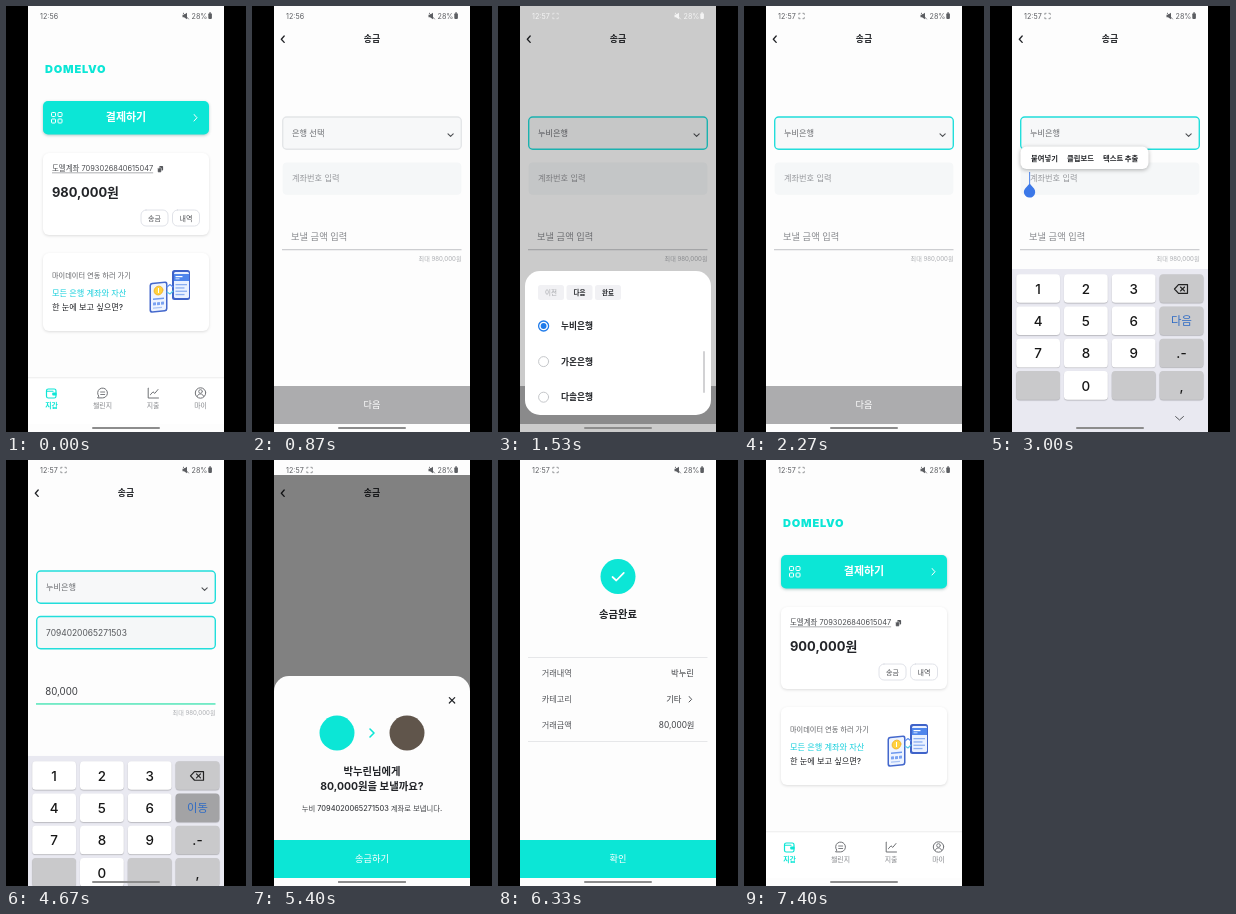
Animation of 240 by 426 pixels, one loop 7.47 s. Source, as an HTML page with a canvas:

```html
<!DOCTYPE html>
<html lang="ko">
<head>
<meta charset="utf-8">
<title>송금</title>
<style>
html, body { margin: 0; width: 100%; height: 100%; overflow: hidden; background: #000; }
canvas { display: block; width: 240px; height: 426px; }
</style>
</head>
<body>
<canvas id="stage"></canvas>
<script>
const W = 240, H = 426, LOOP = 7470, FPS = 15;
const TEAL = '#0ce6d6', RING = '#22dedb', INK = '#222428', GRAY = '#6c6e72', PAPER = '#fdfdfd';
const FONT = 'Inter, "Noto Sans CJK KR", "Noto Sans CJK", sans-serif';
const BANKS = ['누비은행', '가온은행', '다솔은행'];
const PAYEE = '박누린', PAYEE_ACCOUNT = '7094020065271503', MY_ACCOUNT = '7093026840615047';

const canvas = document.getElementById('stage');
const c = canvas.getContext('2d');
const ratio = Math.max(1, window.devicePixelRatio || 1);
canvas.width = W * ratio;
canvas.height = H * ratio;

const clamp = v => Math.max(0, Math.min(1, v));
const ease = v => 1 - Math.pow(1 - clamp(v), 3);
// rises after `a`, falls after `b`
const pulse = (t, a, b, d = 230) => ease((t - a) / d) * (1 - ease((t - b) / d));
const within = (t, a, b) => t >= a && t < b;

function rect(x, y, w, h, color) {
  c.fillStyle = color;
  c.fillRect(x, y, w, h);
}
function box(x, y, w, h, r, fill, stroke, lw = 1) {
  c.beginPath();
  c.roundRect(x, y, w, h, r);
  if (fill) { c.fillStyle = fill; c.fill(); }
  if (stroke) { c.strokeStyle = stroke; c.lineWidth = lw; c.stroke(); }
}
function disc(x, y, r, fill, stroke, lw = 1) {
  c.beginPath();
  c.arc(x, y, r, 0, 7);
  if (fill) { c.fillStyle = fill; c.fill(); }
  if (stroke) { c.strokeStyle = stroke; c.lineWidth = lw; c.stroke(); }
}
function line(color, lw, ...p) {
  c.beginPath();
  for (let i = 0; i < p.length; i += 2) c.lineTo(p[i], p[i + 1]);
  c.strokeStyle = color;
  c.lineWidth = lw;
  c.lineCap = c.lineJoin = 'round';
  c.stroke();
}
function text(s, x, y, size, color = INK, weight = 400, align = 'left') {
  c.font = `${weight} ${size}px ${FONT}`;
  c.fillStyle = color;
  c.textAlign = align;
  c.textBaseline = 'alphabetic';
  c.fillText(s, x, y + size * 0.36);
  return c.measureText(s).width;
}
const mid = (s, x, y, size, color, weight) => text(s, x, y, size, color, weight, 'center');
const right = (s, x, y, size, color, weight) => text(s, x, y, size, color, weight, 'right');

function shadowed(blur, dy, color, draw) {
  c.save();
  c.shadowColor = color;
  c.shadowBlur = blur * ratio;
  c.shadowOffsetY = dy * ratio;
  draw();
  c.restore();
}
function dim(alpha, y = 0) {
  rect(22, y, 196, H - y, `rgba(0,0,0,${alpha})`);
}
function homeBar() {
  box(86, 421, 68, 2, 1, '#8c8c8c');
}
function actionBar(label, color = TEAL) {
  rect(22, 380, 196, 38, color);
  mid(label, 120, 399, 9.2, '#fff', 500);
}

function status(t, col) {
  const late = t >= 900;
  text(late ? '12:57' : '12:56', 34, 10, 7.2, col);
  if (late) {
    for (const sx of [-1, 1]) for (const sy of [-1, 1]) {
      line(col, 0.6, 57.5 + sx * 2.7, 10 + sy * 1.4, 57.5 + sx * 2.7, 10 + sy * 2.7, 57.5 + sx * 1.4, 10 + sy * 2.7);
    }
  }
  c.beginPath();
  c.moveTo(176.5, 8.7); c.lineTo(178, 8.7); c.lineTo(181, 6.8);
  c.lineTo(181, 13.2); c.lineTo(178, 11.3); c.lineTo(176.5, 11.3);
  c.fillStyle = col;
  c.fill();
  line(col, 0.8, 177, 7, 182.5, 13);
  text('28%', 185.5, 10, 7.2, col);
  box(202.3, 7.2, 3.6, 5.8, 1, col);
  rect(203.2, 6.4, 1.8, 1, col);
}

function card(y, h) {
  shadowed(3, 1, 'rgba(0,0,0,.13)', () => box(37, y, 166, h, 6, '#fff'));
}

function phones() {
  box(166, 264, 18, 30, 2.5, '#3f63c9');
  box(168, 266, 15, 26, 1.5, '#eaf1ff');
  rect(168, 268, 15, 7, '#4f86ec');
  rect(169.5, 270, 7, 1.2, '#fff');
  rect(169.5, 272.3, 4, 1, '#cfe0ff');
  for (let i = 0; i < 4; i++) rect(169.5, 278 + i * 3.3, i % 2 ? 9 : 11.5, 1.3, '#8aaef2');
  c.save();
  c.transform(1, -0.1, 0, 1, 0, 15.3);
  box(143.5, 276, 18, 30, 2.5, '#4468cc');
  box(145, 277.5, 15, 27, 1.5, '#eef4ff');
  disc(152.5, 284.5, 4.4, '#ffd23e', '#f0ac20', 0.8);
  rect(152, 282, 1, 5, '#fff');
  rect(147, 292, 11, 1.5, '#6d98ee');
  for (let i = 0; i < 3; i++) box(147 + i * 4, 296, 3, 3, 0.5, '#7ba3f2');
  rect(147, 301, 9, 1.2, '#a9c3f5');
  c.restore();
  line('#5d8ff0', 1.1, 161, 281, 164, 278.5, 167, 281);
  line('#55c8e8', 1.1, 161, 286, 164, 288, 167, 285);
}

function tabBar() {
  rect(22, 372, 196, 46, '#fff');
  rect(22, 371.5, 196, 0.7, '#e6e6e6');
  const tabs = [['지갑', 45.5], ['챌린지', 96.5], ['지출', 147], ['마이', 194.5]];
  tabs.forEach(([name, x], i) => mid(name, x, 399.5, 6.9, i ? '#85878b' : TEAL, i ? 400 : 700));
  const g = '#6f7175';
  box(40.5, 383, 9.5, 9, 1.8, null, TEAL, 1.2);
  line(TEAL, 1.1, 41, 385.3, 47, 385.3);
  box(46.2, 386.6, 4.4, 3, 1, TEAL);
  c.beginPath();
  c.arc(96.5, 387, 4.9, Math.PI * 0.8, Math.PI * 2.5);
  c.lineTo(92, 391.9);
  c.closePath();
  c.strokeStyle = g;
  c.lineWidth = 1;
  c.stroke();
  line(g, 0.9, 94.5, 386, 98.7, 386);
  line(g, 0.9, 94.5, 388.5, 98.7, 388.5);
  line(g, 1, 142.2, 382, 142.2, 392, 152.5, 392);
  line(g, 1, 144.3, 388.8, 147, 385.8, 148.8, 387.4, 152, 383.5);
  disc(194.5, 387, 5.2, null, g, 1);
  disc(194.5, 385.5, 1.8, null, g, 0.9);
  c.beginPath();
  c.arc(194.5, 391.4, 3.4, Math.PI * 1.1, Math.PI * 1.9);
  c.stroke();
}

function home(balance, pressed) {
  c.letterSpacing = '0.8px';
  text('DOMELVO', 39, 63.4, 11, TEAL, 900);
  c.letterSpacing = '0px';

  shadowed(3, 1, 'rgba(0,80,75,.3)', () => box(37, 95, 166, 33.5, 5, TEAL));
  for (const x of [45.5, 52]) for (const y of [106.5, 113]) box(x, y, 4, 4, 0.8, null, '#fff', 1);
  mid('결제하기', 120, 111.5, 11, '#fff', 700);
  line('#fff', 1, 188, 108.5, 191, 111.7, 188, 115);

  card(147, 82);
  const w = text('도멜계좌 ' + MY_ACCOUNT, 46, 162.5, 7.45, '#4a4c50');
  rect(46, 166.6, w, 0.6, '#77797d');
  box(153.3, 160, 3.8, 4.6, 0.8, '#55575b');
  box(151.6, 161.8, 3.8, 4.6, 0.8, '#55575b', '#fff', 0.5);
  text(balance, 46, 186, 12.9, INK, 700);
  box(135, 204, 27, 16, 5, pressed ? '#e3e5e8' : '#fff', '#d9dbe2', 0.8);
  box(166.5, 204, 27, 16, 5, '#fff', '#d9dbe2', 0.8);
  mid('송금', 148.5, 212, 7, '#4c4e52');
  mid('내역', 180, 212, 7, '#4c4e52');

  card(247, 78);
  text('마이데이터 연동 하러 가기', 46, 269, 7.2, '#606266');
  text('모든 은행 계좌와 자산', 46, 287.5, 8.2, '#16cfdc', 500);
  text('한 눈에 보고 싶으면?', 46, 301, 8.2, INK, 500);
  phones();
  tabBar();
}

function header() {
  line(INK, 1.3, 32.2, 30, 29.3, 33.2, 32.2, 36.4);
  mid('송금', 120, 33.2, 8.9, INK, 700);
}

function caret(x, y, h) {
  rect(x, y - h / 2, 0.8, h, '#555');
}

function typed(t) {
  const keys = [3700, 3870, 4070, 4230, 4400];
  const n = keys.filter(k => t >= k).length;
  return n ? Number('80000'.slice(0, n)).toLocaleString('en-US') : '';
}

function form(t) {
  header();
  const picked = t >= 1400, pasted = t >= 3200, amount = typed(t);
  box(30.7, 111, 178.6, 32.3, 4, '#f7f8f9', t >= 1000 ? RING : '#e4e6e8', 1.4);
  text(picked ? BANKS[0] : '은행 선택', 40, 127, 8.2, GRAY);
  line('#4d4f53', 1.1, 196, 127.8, 198.6, 130.4, 201.2, 127.8);

  box(30.7, 156.5, 178.6, 32.3, 4, '#f5f7f8', pasted ? RING : null, 1.4);
  if (pasted) text(PAYEE_ACCOUNT, 40, 173, 8.45, '#55575b');
  else text('계좌번호 입력', 40, 172.5, 8.2, '#96989c');

  if (amount) {
    const w = text(amount, 39.2, 232, 9.7, '#3d3f43');
    if (t < 4600) caret(39.2 + w, 232, 11);
  } else {
    text('보낼 금액 입력', 39, 230.5, 9.25, '#898b8f');
    if (within(t, 3500, 4600)) caret(38.5, 231, 11);
  }
  rect(30, 243.3, 179.5, amount ? 1.3 : 0.9, amount ? '#3be3b0' : '#b9bbbf');
  right('최대 980,000원', 209.5, 253, 6.1, '#adafb3');
  actionBar('다음', amount ? TEAL : '#acacae');
}

function pasteMenu() {
  shadowed(4, 1, 'rgba(0,0,0,.3)', () => box(30.5, 140.5, 128, 22.5, 6, '#fff'));
  text('붙여넣기', 41, 152, 7.3, INK, 700);
  text('클립보드', 77, 152, 7.3, INK, 700);
  text('텍스트 추출', 113, 152, 7.3, INK, 700);
}

function handle() {
  rect(39.2, 166, 0.9, 13, '#3c78e8');
  c.beginPath();
  c.moveTo(39.6, 177.5);
  c.lineTo(44, 182.5);
  c.arc(39.6, 186, 5.6, -0.66, Math.PI + 0.66);
  c.closePath();
  c.fillStyle = '#3c78e8';
  c.fill();
}

function keyboard(t, shift) {
  c.save();
  c.translate(0, shift);
  rect(22, 263, 196, 163, '#e9e9f1');
  const rows = ['123<', '456>', '789.', ' 0 ,'];
  const hits = [['8', 3690], ['0', 3860], ['0', 4050], ['0', 4215], ['0', 4385], ['>', 3400], ['>', 4590]];
  rows.forEach((row, j) => [...row].forEach((k, i) => {
    const x = 26.2 + i * 47.8, y = 268.2 + j * 32.3;
    const gray = i === 3 || k === ' ';
    const hit = hits.some(h => h[0] === k && within(t, h[1], h[1] + 120));
    shadowed(1, 0.7, 'rgba(0,0,0,.25)', () =>
      box(x, y, 43.8, 28.6, 3.5, hit ? '#a3a3a5' : gray ? '#c9c9cb' : '#fff'));
    const cx = x + 21.9, cy = y + 14.8;
    if (k === '<') {
      line('#222', 1.2, cx - 7, cy, cx - 3, cy - 4.3, cx + 6, cy - 4.3, cx + 6, cy + 4.3, cx - 3, cy + 4.3, cx - 7, cy);
      line('#222', 1.1, cx - 1, cy - 2, cx + 3, cy + 2);
      line('#222', 1.1, cx + 3, cy - 2, cx - 1, cy + 2);
    } else if (k === '>') {
      mid(t < 3500 ? '다음' : '이동', cx, cy, 11.3, '#2f6bc4', 400);
    } else if (k !== ' ') {
      mid(k === '.' ? '.-' : k, cx, cy, 13.4, '#161616', 500);
    }
  }));
  line('#55575b', 1, 185.5, 410.5, 189.5, 414, 193.5, 410.5);
  c.restore();
}

function bankSheet(t, shown) {
  dim(0.2 * shown);
  c.save();
  c.translate(0, (1 - shown) * 165);
  box(27, 265, 186, 144, 15, '#fff');
  ['이전', '다음', '완료'].forEach((s, i) => {
    box(40 + i * 28.5, 279, 26, 15, 2.5, '#f1f1f4');
    mid(s, 53 + i * 28.5, 286.7, 6.5, i ? INK : '#a0a2a6', i ? 700 : 400);
  });
  BANKS.forEach((name, i) => {
    const y = 320 + i * 35.6, on = i === 0 && t >= 1400;
    disc(45.6, y, 5, '#fff', on ? '#1f7bea' : '#bfc1c5', on ? 1.3 : 0.9);
    if (on) disc(45.6, y, 2.9, '#1f7bea');
    text(name, 63, y, 8.7, INK, 700);
  });
  box(205, 345, 2, 42, 1, '#d2d2d4');
  c.restore();
}

function confirmSheet(shown) {
  dim(0.49 * shown, 15);
  c.save();
  c.translate(0, (1 - shown) * 210);
  box(22, 216, 196, 210, [15, 15, 0, 0], PAPER);
  line(INK, 1.2, 197.3, 237.6, 202.7, 243);
  line(INK, 1.2, 202.7, 237.6, 197.3, 243);
  disc(85, 273, 17.5, TEAL);
  disc(155, 273, 17.5, '#60554b');
  line(TEAL, 1.6, 118, 269, 122, 273, 118, 277);
  mid(PAYEE + '님에게', 120, 311, 10.3, INK, 700);
  mid('80,000원을 보낼까요?', 120, 326.5, 10.4, INK, 700);
  mid(`${BANKS[0].slice(0, 2)} ${PAYEE_ACCOUNT} 계좌로 보냅니다.`, 120, 348.3, 7.35, '#3f4145', 500);
  actionBar('송금하기');
  homeBar();
  c.restore();
}

function done() {
  disc(120, 116.5, 17.5, TEAL);
  line('#fff', 1.7, 114.5, 117, 118.3, 120.5, 125.8, 112.8);
  mid('송금완료', 120, 154.5, 10.3, INK, 600);
  rect(30, 197, 179.5, 0.8, '#e2e3e5');
  rect(30, 281, 179.5, 0.8, '#e2e3e5');
  const rows = [['거래내역', PAYEE, 196], ['카테고리', '기타', 183.5], ['거래금액', '80,000원', 196.5]];
  rows.forEach(([label, value, x], i) => {
    text(label, 43.7, 213 + i * 26.2, 8.2, '#55575b');
    right(value, x, 213 + i * 26.2, 8.3, '#3d3f43');
  });
  line('#55575b', 1, 191, 236.5, 193.7, 239.3, 191, 242);
  actionBar('확인');
}

function draw(t) {
  c.setTransform(ratio, 0, 0, ratio, 0, 0);
  rect(0, 0, W, H, '#000');
  c.save();
  c.beginPath();
  c.rect(22, 0, 196, H);
  c.clip();
  rect(22, 0, 196, H, PAPER);

  if (t < 600) home('980,000원', within(t, 430, 600));
  else if (t < 4950) form(t);
  else if (t < 5900) header();
  else if (t < 7000) done();
  else home('900,000원', false);

  const bank = pulse(t, 1000, 1950);
  if (bank > 0) bankSheet(t, bank);
  status(t, bank > 0.5 ? '#f4f4f4' : '#5c5e62');
  if (within(t, 2500, 3200)) handle();
  if (within(t, 2730, 3200)) pasteMenu();
  const keys = pulse(t, 2300, 4650);
  if (keys > 0) keyboard(t, (1 - keys) * 163);
  if (within(t, 4950, 5900)) confirmSheet(ease((t - 4950) / 250));
  homeBar();
  c.restore();
}

function tick(now) {
  const t = now % LOOP;
  draw(Math.floor((t + 5) * FPS / 1000) * 1000 / FPS);
  requestAnimationFrame(tick);
}
requestAnimationFrame(tick);
</script>
</body>
</html>
```
